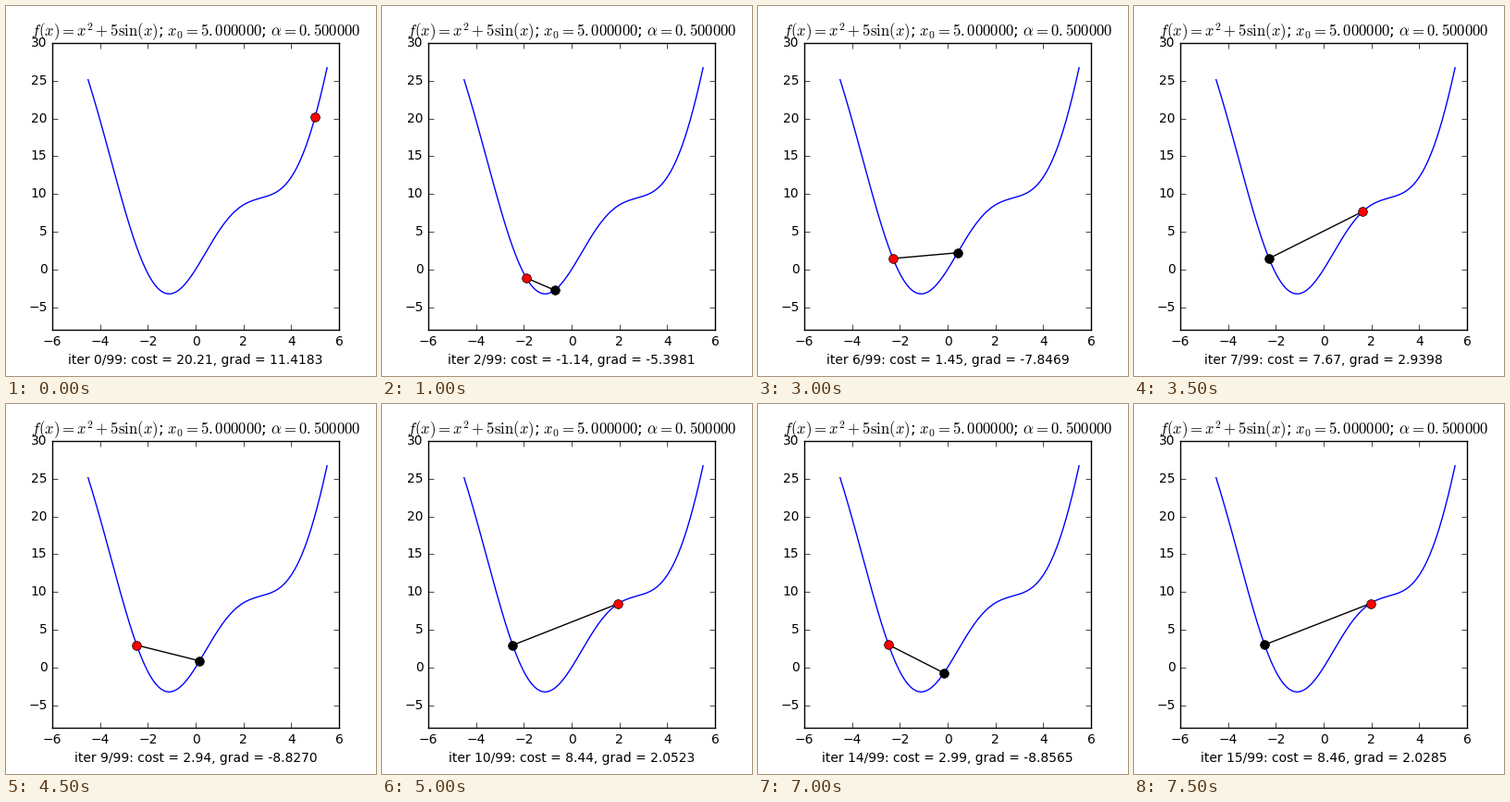
These frames come from a looping animation (400x400 px, 8 s). A matplotlib script:

```python
import matplotlib.pyplot as plt
import numpy as np
from matplotlib.animation import FuncAnimation

plt.style.use("classic")
plt.rcParams["font.size"] = 10

X0, ALPHA = 5.0, 0.5
STEPS, TOTAL = 16, 99


def f(x):
    return x**2 + 5 * np.sin(x)


def grad(x):
    return 2 * x + 5 * np.cos(x)


def spaced(value):
    # grouping the decimals keeps the small gap after the point
    whole, decimals = f"{value:.6f}".split(".")
    return f"{whole}.{{{decimals}}}"


path = [X0]
for _ in range(STEPS - 1):
    path.append(path[-1] - ALPHA * grad(path[-1]))

fig = plt.figure(figsize=(4, 4), dpi=100, facecolor="white")
ax = fig.add_axes([0.125, 0.125, 0.775, 0.775])
ax.set_xlim(-6, 6)
ax.set_ylim(-8, 30)
ax.set_title(
    rf"$f(x) = x^2 + 5\sin(x)$; $x_0 = {spaced(X0)}$; $\alpha = {spaced(ALPHA)}$"
)

xs = np.linspace(-4.5, 5.5, 1000)
ax.plot(xs, f(xs), "b-")
link, = ax.plot([], [], "k-")
previous, = ax.plot([], [], "ko", markersize=7)
current, = ax.plot([], [], "ro", markersize=7)
label = ax.set_xlabel("")


def draw(i):
    x = path[i]
    before = np.array(path[max(i - 1, 0):i])
    pair = np.append(before, x)
    link.set_data(pair, f(pair))
    previous.set_data(before, f(before))
    current.set_data([x], [f(x)])
    label.set_text(f"iter {i}/{TOTAL}: cost = {f(x):.2f}, grad = {grad(x):.4f}")
    return link, previous, current, label


anim = FuncAnimation(fig, draw, frames=STEPS, interval=500, repeat=True,
                     repeat_delay=0, blit=False)
plt.show()
```
